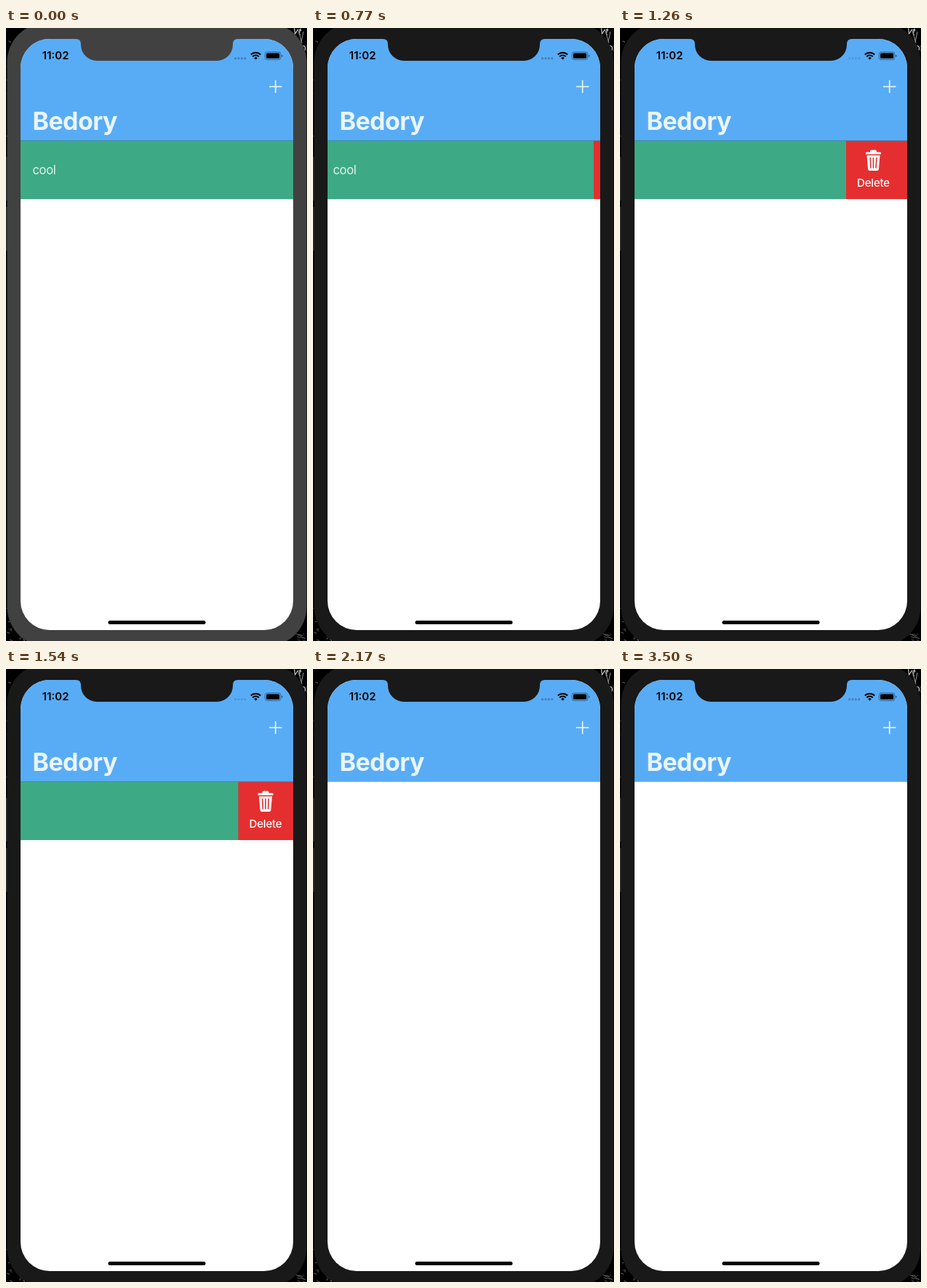
An HTML page for the animation above (3.57 s loop, 414 by 842 pixels).

```html
<!DOCTYPE html>
<html lang="en">
<head>
<meta charset="utf-8">
<title>Swipe to delete</title>
<style>
  html, body { margin: 0; width: 100%; height: 100%; overflow: hidden; background: #000; }
  svg { display: block; width: 414px; height: 842px; }
  text { font-family: Inter, Roboto, "Liberation Sans", sans-serif; }
  .title { font-size: 34px; font-weight: 700; letter-spacing: -.6px; fill: #eaf5f8; }
  .clock { font-size: 15px; font-weight: 600; text-anchor: middle; }
  .item { font-size: 16.6px; letter-spacing: -.4px; fill: #e0f4ec; }
  .action { font-size: 15px; font-weight: 500; letter-spacing: -.2px; text-anchor: middle; fill: #fff; }
  .scrap { font-size: 13px; fill: #ddd; }
</style>
</head>
<body>
<svg viewBox="0 0 414 842">
  <defs>
    <clipPath id="screen"><rect x="20" y="15" width="375" height="812" rx="40"/></clipPath>
    <clipPath id="rowBox"><rect x="20" y="155" width="375" height="80"/></clipPath>
  </defs>

  <rect width="414" height="842"/>
  <g id="specks" stroke-linecap="round"></g>
  <rect x="0" y="177" width="4" height="129" fill="#2a2a2a"/>
  <rect x="0" y="237" width="4" height="9" fill="#000"/>
  <g class="scrap">
    <text transform="translate(394 7) rotate(14)">yt</text>
    <text x="405" y="32">or</text>
  </g>
  <path d="M396 8l9 12M402 3l5 18M409 5l-3 15" stroke="#999" fill="none"/>

  <rect class="bezel" x="1.5" y="-7" width="412" height="856" rx="54"/>

  <g clip-path="url(#screen)">
    <rect x="20" y="15" width="375" height="812" fill="#fff"/>
    <rect x="20" y="15" width="375" height="140" fill="#58acf5"/>

    <g id="row" clip-path="url(#rowBox)">
      <rect x="20" y="155" width="375" height="80" fill="#e52e2f"/>
      <g id="cell">
        <rect x="20" y="155" width="375" height="80" fill="#3daa85"/>
        <text class="item" x="36.5" y="201">cool</text>
        <g transform="translate(432.5 0)">
          <path fill="#fff" d="M-10.5 171.5q0-1 1-1H-4.5v-1q0-2 2-2h5q2 0 2 2v1h5q1 0 1 1v2h-21z
            M-9 175H9L7.4 194q-.2 2-2.2 2h-10.4q-2 0-2.2-2z"/>
          <path d="M-4.3 178.5l.7 13.5M0 178.5V192M4.3 178.5l-.7 13.5"
            stroke="#e52e2f" stroke-width="1.6" stroke-linecap="round"/>
          <text class="action" x="0" y="218">Delete</text>
        </g>
      </g>
    </g>
    <rect id="hairline" x="20" y="154.4" width="375" height=".8" fill="#3c7d9c"/>

    <text class="title" x="36.5" y="139.5">Bedory</text>
    <path d="M362 80.5h17.5M370.7 71.8v17.5" stroke="#f4faff" stroke-width="1.6"/>

    <path class="bezel" d="M96 10V15q7 0 7 7v1a22 22 0 0 0 22 22H290a22 22 0 0 0 22-22v-1q0-7 7-7V10z"/>

    <text class="clock" x="68.2" y="43.3">11:02</text>
    <g id="dots" fill="#4279ad">
      <circle cx="315.6" cy="41.7" r="1.6"/><circle cx="320" cy="41.7" r="1.6"/>
      <circle cx="324.4" cy="41.7" r="1.6"/><circle cx="328.8" cy="41.7" r="1.6"/>
    </g>
    <g fill="none" stroke="#000" stroke-width="2.1">
      <path d="M336.8 36.6a9.6 9.6 0 0 1 13.4 0M339.2 39.2a6.2 6.2 0 0 1 8.6 0"/>
    </g>
    <path d="M343.5 43.6l-2.3-2.4a3.3 3.3 0 0 1 4.6 0z"/>
    <rect x="356.4" y="33" width="21.4" height="10.4" rx="2.8" fill="none" stroke="#31618c" stroke-width="1"/>
    <rect x="358" y="34.6" width="18.2" height="7.2" rx="1.5"/>
    <path d="M379 36.5q1.6.5 1.6 1.7t-1.6 1.7z" fill="#31618c"/>
    <rect x="140.5" y="814" width="134" height="5" rx="2.5"/>
  </g>
</svg>
<script>
  const LOOP = 3570, TICK = 70;
  const FOCUS = 770, REMOVED = 2170;
  // [time, how far the cell is pulled left]
  const pull = [[700, 0], [770, 9], [840, 38], [910, 70], [980, 86], [1120, 87.5], [1260, 84]];
  const REST = 74.3;

  const byId = id => document.getElementById(id);
  const row = byId('row'), cell = byId('cell'), dots = byId('dots'), hairline = byId('hairline');
  const bezels = document.querySelectorAll('.bezel');

  function offset(t) {
    if (t <= pull[0][0]) return 0;
    const [endTime, endX] = pull[pull.length - 1];
    if (t >= endTime) return REST + (endX - REST) * Math.exp(-(t - endTime) / 135);
    const i = pull.findIndex(p => p[0] > t);
    const [t0, x0] = pull[i - 1], [t1, x1] = pull[i];
    return x0 + (x1 - x0) * (t - t0) / (t1 - t0);
  }

  // Faint scraps of the desktop behind the rounded corners
  function scatter() {
    let seed = 7;
    const rand = () => (seed = seed * 16807 % 2147483647) / 2147483647;
    const areas = [[0, 10, 5, 150, 22], [0, 790, 30, 52, 60], [380, 832, 30, 10, 14]];
    let marks = '';
    for (const [x, y, w, h, count] of areas) {
      for (let i = 0; i < count; i++) {
        const px = x + rand() * w, py = y + rand() * h, len = 1 + rand() * 3;
        const tone = 50 + Math.round(rand() * 80);
        marks += `<path d="M${px} ${py}l${len} ${len * .4}" stroke="rgb(${tone},${tone},${tone})"/>`;
      }
    }
    byId('specks').innerHTML = marks;
  }

  function draw(now) {
    const t = Math.floor(now % LOOP / TICK) * TICK;
    const hasRow = t < REMOVED;
    const shade = t < FOCUS ? '#414141' : '#191919';
    bezels.forEach(b => b.setAttribute('fill', shade));
    row.style.display = hairline.style.display = hasRow ? '' : 'none';
    cell.setAttribute('transform', `translate(${-offset(t)} 0)`);
    dots.setAttribute('opacity', t >= 910 && t < 1750 ? .4 : .85);
  }

  scatter();
  const start = performance.now();
  function loop() {
    draw(performance.now() - start);
    requestAnimationFrame(loop);
  }
  loop();
</script>
</body>
</html>
```
